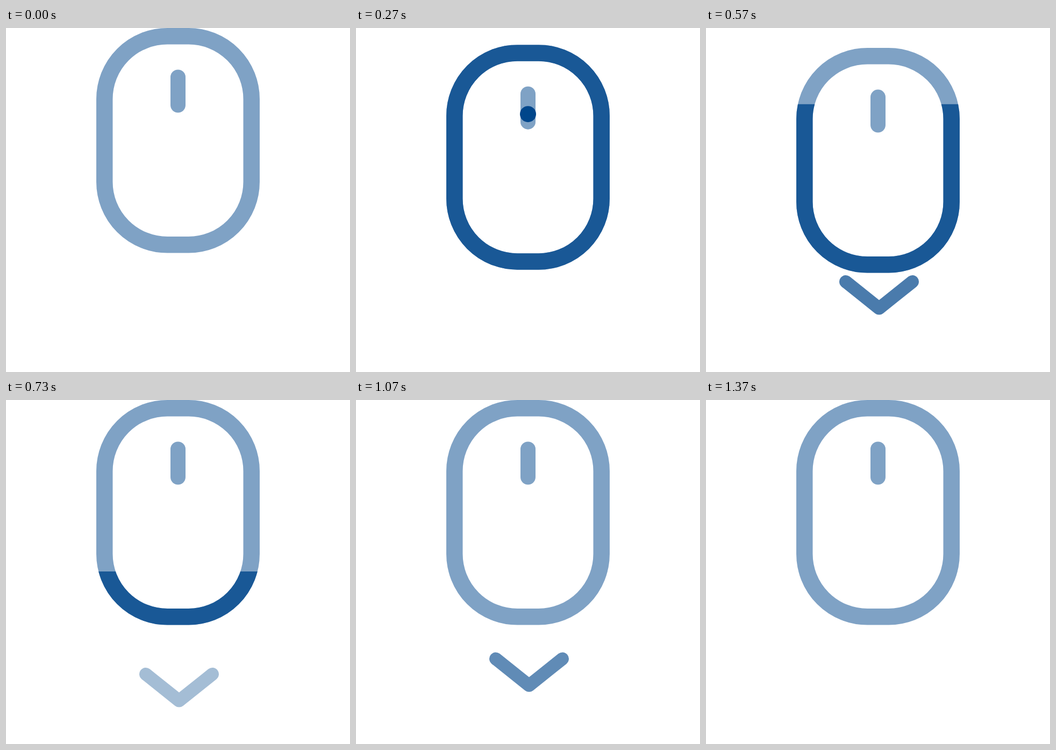
Animation of 640x640 px, one loop 1.43 s. Source, as an HTML page:

```html
<!DOCTYPE html>
<html lang="en">
<head>
<meta charset="utf-8">
<title>Scroll down</title>
<style>
  html, body { margin: 0; height: 100%; overflow: hidden; background: #fff; }
  svg { display: block; width: 100vw; height: 100vh; }
  .line { fill: none; stroke: #00468b; }
</style>
</head>
<body>
<svg viewBox="0 0 640 640">
  <defs>
    <rect id="body" x="183.25" y="15.25" width="273.5" height="388" rx="117" stroke-width="30.5"/>
    <clipPath id="wipe"><rect id="band" x="160" width="320"/></clipPath>
  </defs>
  <g id="mouse">
    <use href="#body" class="line" opacity=".5"/>
    <g clip-path="url(#wipe)"><use href="#body" class="line" opacity=".8"/></g>
    <rect x="306" y="77.5" width="28" height="80" rx="14" fill="#00468b" opacity=".5"/>
    <circle id="dot" cx="320" r="15" fill="#00468b"/>
  </g>
  <path id="arrow" class="line" d="M260 0L322 49.5L384 0" stroke-width="24" stroke-linecap="round" stroke-linejoin="round"/>
</svg>
<script>
  const LOOP = 1430;
  const [mouse, band, dot, arrow] = ['mouse', 'band', 'dot', 'arrow'].map(id => document.getElementById(id));

  const progress = (s, from, to) => Math.min(1, Math.max(0, (s - from) / (to - from)));
  const smooth = x => x * x * (3 - 2 * x);
  const ease = (s, from, to) => smooth(progress(s, from, to));
  const set = (el, attrs) => { for (const key in attrs) el.setAttribute(key, attrs[key]); };

  // Motion is drawn at 25 steps a second, shown on a 30 Hz clock.
  const stepAt = ms => Math.ceil(Math.floor((ms + 4) * 0.03) * 5 / 6 - 0.5);

  function draw(s) {
    set(mouse, { transform: `translate(0 ${50 * (ease(s, 0, 12) - ease(s, 12, 18))})` });

    const top = Math.max(0, 445 * ease(s, 10, 22) - 10.75);
    const bottom = 419 * ease(s, 0, 7);
    set(band, { y: top, height: Math.max(0, bottom - top) });

    set(dot, {
      cy: 89 + 51 * ease(s, 0, 10),
      opacity: progress(s, 0, 3) - progress(s, 7, 10)
    });

    // Two arrow pulses, 12 steps each.
    const p = s < 10 || s >= 34 ? 0 : (s - 10) % 12;
    set(arrow, {
      transform: `translate(0 ${434 + 9.5 * p})`,
      opacity: 0.8 * (progress(p, 0, 3) - progress(p, 3, 12))
    });
  }

  function tick() {
    draw(stepAt(performance.now() % LOOP));
    requestAnimationFrame(tick);
  }
  tick();
</script>
</body>
</html>
```
